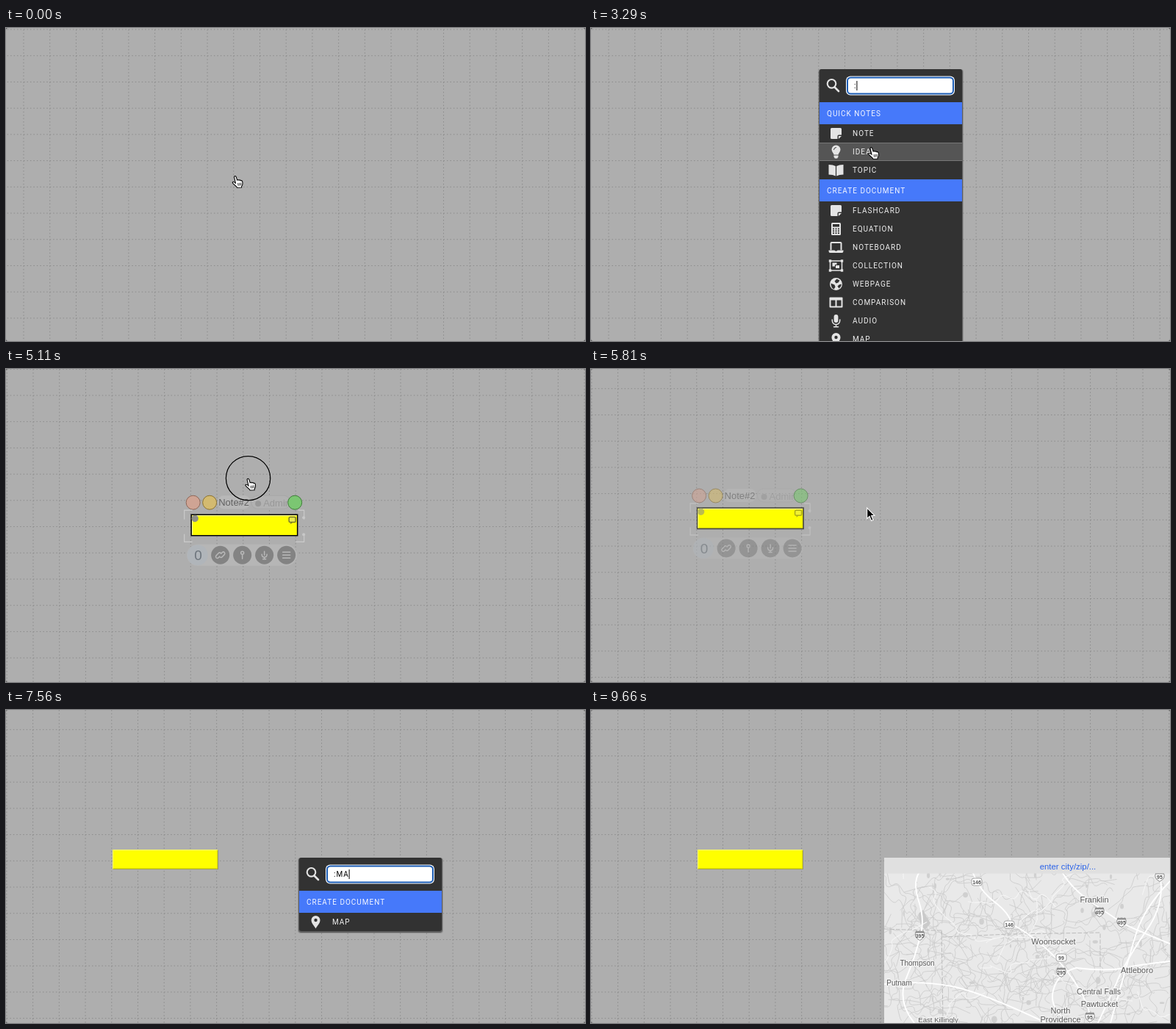
Recreate the animation shown at these times as an HTML page. Size 788x426 px, loop 9870 ms.

```html
<!DOCTYPE html>
<html lang="en">
<head>
<meta charset="utf-8">
<title>Quick notes board</title>
<style>
  html, body { margin: 0; width: 100%; height: 100%; overflow: hidden; background: #555; }
  svg { display: block; width: 788px; height: 426px; }
  .ui { font: 10px Roboto, sans-serif; letter-spacing: 1px; }
  .sans { font-family: "Liberation Sans", Arial, sans-serif; }
</style>
</head>
<body>
<svg id="stage" viewBox="0 0 788 426" xmlns="http://www.w3.org/2000/svg"></svg>
<script>
const LOOP = 9870, TICK = 70, CELL = 35.72;
const stage = document.getElementById('stage');

const clamp = v => Math.max(0, Math.min(1, v));
const ramp = (t, a, b) => clamp((t - a) / (b - a));
const smooth = u => u * u * (3 - 2 * u);
const mix = (a, b, u) => a + (b - a) * u;
const within = (t, a, b) => t >= a && t < b;
const repeat = (n, f) => Array.from({ length: n }, (_, i) => f(i)).join('');
const at = (x, y, body, extra = '') => `<g transform="translate(${x} ${y})" ${extra}>${body}</g>`;
const rect = (x, y, w, h, fill, extra = '') =>
  `<rect x="${x}" y="${y}" width="${w}" height="${h}" fill="${fill}" ${extra}/>`;
const disc = (x, y, r, fill, extra = '') => `<circle cx="${x}" cy="${y}" r="${r}" fill="${fill}" ${extra}/>`;
const path = (d, extra = '') => `<path d="${d}" ${extra}/>`;
const text = (x, y, s, extra = '') => `<text x="${x}" y="${y}" ${extra}>${s}</text>`;
const line = (d, color, w, extra = '') =>
  path(d, `fill="none" stroke="${color}" stroke-width="${w}" stroke-linecap="round" stroke-linejoin="round" ${extra}`);

// ---------- board ----------
const gridLines = `<path d="${
  repeat(25, i => `M${i * CELL} 0V500`) + repeat(15, i => `M0 ${i * CELL}H900`)
}" fill="none" stroke="#8b8b8b" stroke-width="1" stroke-dasharray="1.5 2.965"/>`;

function grid(x, y) {
  const wrap = v => ((v % CELL) + CELL) % CELL - CELL;
  return rect(0, 0, 788, 426, '#aeaeae', 'rx="3"') + at(wrap(x), wrap(y), gridLines);
}

// ---------- menu ----------
const INK = '#e4e4e4', DARK = '#323232';
const stroked = (d, w = 1.8) => line(d, INK, w);
const solid = d => path(d, `fill="${INK}"`);
const pinIcon = solid('M0 9C-2 5-6 2-6-2.5A6 6 0 0 1 6-2.5C6 2 2 5 0 9Z') + disc(0, -2.5, 2.2, DARK);
const noteIcon = solid('M-6-7.5H6Q7.5-7.5 7.5-6V2H3.5Q2 2 2 3.5V7.5H-6Q-7.5 7.5-7.5 6V-6Q-7.5-7.5-6-7.5ZM3.4 7.5V3.4H7.5Z');
const icons = {
  NOTE: noteIcon,
  FLASHCARD: noteIcon,
  IDEA: solid('M-3 4C-3 2-6 0-6-3A6 6 0 0 1 6-3C6 0 3 2 3 4ZM-3 5H3V7L1.5 9H-1.5L-3 7Z') + line('M-3-3Q-3-5.6 0-6', DARK, 1),
  TOPIC: solid('M-.6-5.4Q-4-7.5-10-7.5V6Q-4 6-.6 8ZM.6-5.4Q4-7.5 10-7.5V6Q4 6 .6 8Z'),
  EQUATION: rect(-6.5, -8.5, 13, 17, INK, 'rx="1.5"') + rect(-4.5, -6.5, 9, 3.6, DARK) +
    repeat(9, i => rect(-4.5 + i % 3 * 3.5, -1 + Math.floor(i / 3) * 2.9, 2, 1.8, DARK)),
  NOTEBOARD: stroked('M-7 3V-5.5Q-7-6.5-6-6.5H6Q7-6.5 7-5.5V3', 2) + solid('M-10 4H-2L-1 5H1L2 4H10V5Q10 7.5 8 7.5H-8Q-10 7.5-10 5Z'),
  COLLECTION: stroked('M-8-6.5H8V6.5H-8Z', 1.5) + rect(-5, -4, 6, 5, INK) + rect(-1, -1, 6, 5, INK, `stroke="${DARK}"`) +
    repeat(4, i => rect(i % 2 ? 6.3 : -9.7, i < 2 ? -8.2 : 4.8, 3.4, 3.4, INK)),
  WEBPAGE: disc(0, 0, 8.5, INK) + path('M-7-1L-2 1-1 4-3 7Q-7 5-7-1ZM1-7L5-5 3-2 0-1-2-4ZM4 1L7.5 0Q7 4 4 6L2 3Z', `fill="${DARK}"`),
  COMPARISON: solid('M-8-7H8Q9-7 9-6V6Q9 7 8 7H-8Q-9 7-9 6V-6Q-9-7-8-7Z') + rect(-7, -3, 6, 8, DARK) + rect(1, -3, 6, 8, DARK),
  AUDIO: rect(-2.9, -8.5, 5.8, 11, INK, 'rx="2.9"') + stroked('M-5.3-1.5Q-5.3 5 0 5Q5.3 5 5.3-1.5M0 5V8M-3 8.3H3', 1.5),
  MAP: pinIcon
};
const fullList = [
  ['QUICK NOTES', ['NOTE', 'IDEA', 'TOPIC']],
  ['CREATE DOCUMENT', ['FLASHCARD', 'EQUATION', 'NOTEBOARD', 'COLLECTION', 'WEBPAGE', 'COMPARISON', 'AUDIO', 'MAP']]
];
const mapOnly = [['CREATE DOCUMENT', ['MAP']]];

function menu({ x, y, list, typed, caret, hover, ring }) {
  let top = 45, body = '';
  for (const [title, items] of list) {
    body += rect(0, top, 194, 30, '#4679fa') + text(10, top + 18.6, title, 'fill="#f4f6ff"');
    top += 30;
    for (const name of items) {
      if (name === hover) body += rect(0, top, 194, 25, '#555') + line(`M0 ${top + .5}H194M0 ${top + 24.5}H194`, '#777', 1);
      body += at(22.5, top + 12.5, icons[name]) + text(45, top + 15.8, name, 'fill="#f0f0f0"');
      top += 25;
    }
  }
  const width = [0, 3.4, 13.1, 20.6, 28][typed.length];
  const input = rect(36, 9.5, 148, 26, '#fff', 'rx="6"') +
    rect(38, 11.5, 144, 22, '#fff', `rx="4.5" stroke="${ring}" stroke-width="2"`) +
    text(47, 26, typed, 'fill="#000"') + (caret ? rect(47 + width, 16, 1, 13, '#000') : '');
  const search = line('M20.5 24.5L26 30', INK, 2.6) + disc(16.5, 19.8, 5.8, 'none', `stroke="${INK}" stroke-width="2.1"`);
  return at(x, y,
    rect(-2, 0, 198, top + 3, '#000', 'rx="4" opacity=".16"') + rect(-1, 0, 196, top + 2, '#000', 'rx="4" opacity=".35"') +
    rect(0, 0, 194, top, DARK, 'rx="3"') + search + input + body, 'class="ui"');
}

// ---------- note ----------
const toolIcons = [
  'M-1 2L-3 4Q-5 5-6 3Q-6.5 1.5-5 0L-2-3Q0-4 1-2M1-2L3-4Q5-5 6-3Q6.5-1.5 5 0L2 3Q0 4-1 2',
  'M0 5V0M-2-3A2 2 0 1 0 2-3A2 2 0 1 0-2-3Z',
  'M0-5V0M-3.5-1Q-3.5 3 0 3Q3.5 3 3.5-1M0 3V5M-2 5.5H2',
  'M-5-4H5M-5 0H5M-5 4H5'
];
const controls = at(-.4, -1,
  rect(36, -26, 44, 18, '#b8b8b8', 'rx="8"') +
  text(37, -12.5, 'Note#2', 'class="sans" font-size="13" fill="#626262"') +
  rect(82, -26, 52, 18, '#b2b2b2', 'rx="8" stroke="#a7a7a7"') + disc(91, -15, 4, '#999') +
  text(98, -11.5, 'Admin', 'class="sans" font-size="13" fill="#989898"') +
  disc(2.5, -16.5, 9.5, '#cfa494', 'stroke="#8e6657"') +
  disc(25, -16.5, 9.5, '#d3ba70', 'stroke="#8b722f"') +
  disc(141, -16.5, 9.5, '#7bc672', 'stroke="#3e7c38"') +
  line('M-9.5 6V-6H1M-9.5 27V37H1M146-6H153.5V6M143 37H153.5V27', '#c8c8c8', 1.3) +
  disc(153, 4, 2, '#c8c8c8') + disc(153, 27, 2, '#c8c8c8') +
  rect(0, 0, 144.5, 28.5, '#ff0', 'stroke="#000" stroke-width="1.5"') +
  line('M1.5 27V1.5H143', '#ffffb8', 1) +
  disc(5, 5.3, 4.7, '#8f8f86') +
  rect(133, 3.3, 9, 7, '#e8e850', 'rx="1.5" stroke="#78782c" stroke-width="1.5"') + path('M135 10.5V13L138 10.5Z', 'fill="#78782c"') +
  rect(-6, 40.5, 150, 29, '#b6b6b6', 'rx="14.5"') + disc(8.5, 55, 14, '#b0b5ba') +
  text(9.5, 61.5, '0', 'class="sans" font-size="19" fill="#6c747c" text-anchor="middle"') +
  toolIcons.map((d, i) => at(39.5 + 30 * i, 55, disc(0, 0, 12.5, '#838383') + line(d, '#b9b9b9', 1.5))).join(''));

const note = (x, y, active) => at(x, y,
  rect(.5, .8, 143.3, 26.2, '#8f8f55') + rect(0, 0, 143, 26.2, '#ff0') +
  line('M.7 25.5V.7H142.3', '#ffff58', 1.4) + line('M142.3 1.4V25.5H1.4', '#e6e600', 1.2) +
  (active > 0 ? `<g opacity="${active}">${controls}</g>` : ''));

// ---------- map ----------
let seed = 77;
const random = () => (seed = (seed * 16807) % 2147483647) / 2147483647;

function wander(steps, stride) {
  let x = 399 + random() * 389, y = 222 + random() * 204, turn = random() * 6.28;
  let d = `M${x.toFixed(1)} ${y.toFixed(1)}`;
  for (let i = 0; i < steps; i++) {
    turn += (random() - .5) * 1.3;
    const dx = Math.cos(turn) * stride, dy = Math.sin(turn) * stride;
    d += `T${(x += dx).toFixed(1)} ${(y += dy).toFixed(1)}`;
  }
  return d;
}

const minorRoads = line(repeat(200, () => wander(8, 11)), '#cdcdcd', .9);
const ponds = repeat(34, () => `<ellipse cx="${399 + random() * 389}" cy="${222 + random() * 204}" rx="${1 + random() * 3}" ry="${1 + random() * 4}" fill="#d0d0d0"/>`) +
  path('M446 277L452 272 457 282 462 290 455 299 449 294Z', 'fill="#cacaca"');
const lightRoads = line(repeat(12, () => wander(9, 14)), '#f5f5f5', 1.1);
const highways = [
  'M446 222Q438 236 446 260T449 304Q442 334 429 365T440 426',
  'M520 222Q528 245 549 261T572 291Q618 316 649 357T680 426',
  'M642 222Q655 244 683 263T722 289T788 318',
  'M774 222Q782 262 758 297T720 360Q707 390 690 426',
  'M788 342Q750 346 726 351T660 351Q635 358 629 382T651 426',
  'M399 373Q450 368 491 376T620 426',
  'M788 233Q752 270 741 307T707 426'
].map(d => line(d, '#fff', 1.9)).join('');
const borders = line('M399 298Q450 300 477 300L478 309 570 305 693 303V359M477 300L479 420', '#bcbcbc', 1, 'stroke-dasharray="5 3"');

const shieldText = (n, y) => text(0, y, n, 'font-size="7" font-weight="bold" fill="#555" text-anchor="middle"');
const interstate = (n, x, y) => at(x, y,
  path('M-5-6Q-2.5-5 0-6Q2.5-5 5-6Q9 2 0 6.5Q-9 2-5-6Z', 'fill="#fff" stroke="#8c8c8c"') +
  path('M-5-6Q-2.5-5 0-6Q2.5-5 5-6L6.2-3.4H-6.2Z', 'fill="#8c8c8c"') + shieldText(n, 2.8));
const route = (n, x, y) => at(x, y, rect(-7, -5, 14, 10, '#fff', 'rx="3" stroke="#a5a5a5"') + shieldText(n, 2.6));
const place = (name, x, y, size = 11) =>
  text(x, y, name, `font-size="${size}" fill="#5c5c5c" stroke="#f2f2f2" stroke-width="2.4" paint-order="stroke" text-anchor="middle"`);

const labels = interstate(95, 774, 227) + interstate(495, 692, 275) + interstate(495, 722, 289) + interstate(395, 447.5, 307) +
  interstate(295, 640, 357) + interstate(95, 679, 418) + route(146, 525, 234) + route(146, 569, 292) + route(99, 640, 337) +
  place('Franklin', 685, 262) + place('Woonsocket', 629.5, 319) + place('Thompson', 444, 348, 10) + place('Attleboro', 743, 358) +
  place('Central Falls', 691, 386.5, 10.7) + place('Pawtucket', 692, 403.5) + place('North', 639, 413) + place('Providence', 639, 425) +
  place('Putnam', 419.5, 375, 10) + place('East Killingly', 472.5, 425, 9.6);
const roads = `<g clip-path="url(#mapArea)">${minorRoads + ponds + lightRoads + borders + highways}</g>`;
const mapClip = '<clipPath id="mapArea"><rect x="399" y="222" width="389" height="204"/></clipPath>';

const mapCard = t => `<g class="sans">${
  rect(399, 201, 389, 225, '#e9e9e9') + (t >= 9100 ? mapClip + roads : '') + (t >= 9170 ? labels : '') +
  rect(399, 201, 389, 21.5, '#e0e0e0') +
  text(649, 216.5, 'enter city/zip/...', 'font-size="11.4" fill="#2a62e8" text-anchor="middle"')}</g>`;

// ---------- pointer ----------
const shapes = {
  arrow: path('M0 0V14.5L3.4 11.4 5.9 17.4 8.4 16.4 5.9 10.6 10.2 10.2Z', 'fill="#000" stroke="#fff" stroke-width="1.1"'),
  hand: path('M-1.4 1.8Q-1.2 .3 .2 .6Q1 .9 1.4 2.2L2.6 6Q4 4.8 5 6.2Q6.6 5.2 7.4 6.8Q9.2 6.2 9.8 8.2L10 11Q9.9 13 8.6 14.5V16L2.4 16.2 1.8 15-3 10.6Q-4.4 9-3 8.5Q-1.6 8.3 .4 10Z', 'fill="#fff" stroke="#000" stroke-width="1.1"') +
    line('M3.6 10.5L4.1 13.4M5.6 10.2L6 13.2M7.6 10L7.8 12.8', '#000', .8),
  open: path('M-2.5 9L-6 3.5Q-7 1.5-5.5 1.3L-3.6 2.6-5-3.5Q-4.6-5.6-3-4.2L-1.8-.6-2-5.5Q-.8-7.5 .3-5.5L.8-.8 1.8-5.4Q3.2-6.8 3.8-5L3.4-.4 5-3.4Q6.8-4.2 6.6-2.2L5.4 4 4.4 9Z', 'fill="#fff" stroke="#000" stroke-width="1.1"')
};

// The board is dragged along a curve that rises towards its end.
function dragOffset(t) {
  const u = smooth(Math.pow(ramp(t, 4690, 5470), 1.48));
  return { x: -166 * u, y: -11 * Math.pow(u, 1.75) };
}

// start, end, target x, target y
const moves = [
  [490, 980, 356, 212], [2730, 3290, 381.5, 162], [3290, 3570, 388, 150.5], [5470, 6020, 450, 213],
  [7980, 8540, 440.5, 284], [8960, 9170, 355, 316], [9310, 9660, 390, 434]
];

function pointerAt(t) {
  const drag = dragOffset(t);
  let x = 312, y = 201;
  for (const [a, b, tx, ty] of moves) {
    if (a === 5470) { x += drag.x; y += drag.y; }
    const u = smooth(ramp(t, a, b));
    x = mix(x, tx, u);
    y = mix(y, ty, u);
  }
  return { x, y };
}

function pointer(t, { x, y }) {
  if (within(t, 7210, 8050)) return '';
  const arrow = within(t, 560, 2800) || (within(t, 2800, 3780) && y > 206) || within(t, 5810, 7210) || (within(t, 8050, 8680) && y < 276);
  const kind = within(t, 8610, 8820) ? 'open' : arrow ? 'arrow' : 'hand';
  const pressed = within(t, 140, 350) || within(t, 3780, 3920) || within(t, 4690, 5470) || within(t, 8610, 8820);
  const fade = within(t, 280, 350) ? .5 : 1;
  const halo = disc(0, 0, 31, 'none', 'stroke="#fff" stroke-width=".6" opacity=".5"') + disc(0, 0, 30.2, 'none', 'stroke="#000" stroke-width="1.3"');
  return at(x, y, (pressed ? `<g opacity="${fade}">${halo}</g>` : '') + shapes[kind]);
}

// ---------- scene ----------
const ringColor = (t, start) => t < start ? '#444' : t < start + 70 ? '#14263f' : '#1b5cb4';

function openMenu(t, mouse) {
  if (within(t, 1750, 3850)) {
    const row = t >= 2800 ? ['NOTE', 'IDEA', 'TOPIC'][Math.floor((mouse.y - 131) / 25)] : '';
    const caret = within(t, 1750, 2240) || within(t, 2800, 3360);
    return menu({ x: 311, y: 56, list: fullList, typed: ':', caret, hover: row, ring: ringColor(t, 1750) });
  }
  if (within(t, 6650, 8820)) {
    const typed = ':MAP'.slice(0, 1 + (t >= 7140) + (t >= 7560) + (t >= 7840));
    const narrowed = t >= 7210;
    return menu({
      x: 399, y: narrowed ? 201 : 56, list: narrowed ? mapOnly : fullList, typed,
      caret: t < 8400, hover: t >= 8050 && mouse.y > 276 ? 'MAP' : '', ring: ringColor(t, 6720)
    });
  }
  return '';
}

function scene(t) {
  const drag = dragOffset(t), mouse = pointerAt(t);
  const active = ramp(t, 4060, 4480) * (1 - ramp(t, 5670, 6020));
  return grid(24 + drag.x, 2 + drag.y) +
    (t >= 3850 ? note(311 + drag.x, 201 + drag.y, active) : '') +
    (t >= 8820 ? mapCard(t) : '') + openMenu(t, mouse) + pointer(t, mouse);
}

const start = performance.now();
let shown = -1;
function draw() {
  const tick = Math.floor(((performance.now() - start) % LOOP) / TICK) * TICK;
  if (tick !== shown) stage.innerHTML = scene(shown = tick);
  requestAnimationFrame(draw);
}
draw();
</script>
</body>
</html>
```
